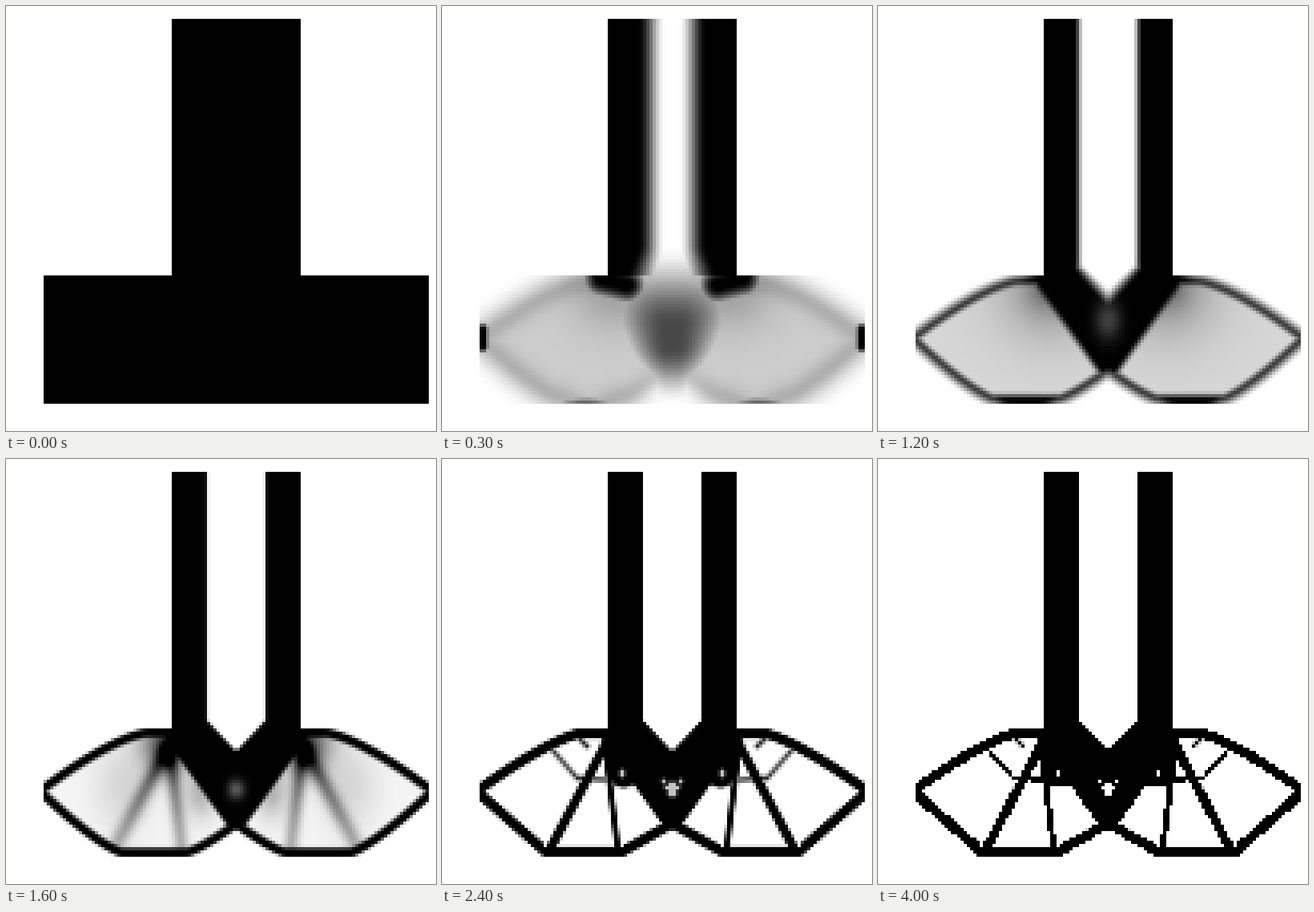
Animation of 537x530 px, one loop 5000 ms. Source, as an HTML page with a canvas:

```html
<!DOCTYPE html>
<html lang="en">
<head>
<meta charset="utf-8">
<title>Topology optimisation</title>
<style>
html, body { margin: 0; width: 100%; height: 100%; overflow: hidden; background: #fff; }
canvas { display: block; }
</style>
</head>
<body>
<canvas id="stage" width="537" height="530"></canvas>
<script>
const N = 120, HALF = 60, LOOP = 5000, STEP = 100, LAST = 4000;

const clamp = x => Math.min(1, Math.max(0, x));
const mix = (a, b, p) => a + (b - a) * p;
const smooth = (a, b, x) => { const p = clamp((x - a) / (b - a)); return p * p * (3 - 2 * p); };
const cover = (s, w) => smooth(-w, w, s);
const bell = (x, y = 0) => Math.exp(-x * x - y * y);
const signedPow = (x, p) => Math.sign(x) * Math.abs(x) ** p;

// Distances are in cells, positive inside; u runs from the left edge to the mirror axis
function bar(u, v, ax, ay, bx, by, half) {
  const dx = bx - ax, dy = by - ay;
  const k = clamp(((u - ax) * dx + (v - ay) * dy) / (dx * dx + dy * dy));
  return half - Math.hypot(u - ax - k * dx, v - ay - k * dy);
}
const gap = (f, u, v) => (v - f(u)) / Math.hypot(1, f(u + 0.5) - f(u - 0.5));

// Two power curves enclose the foot of the part
function foot(reach, topPower, flat, lowPower) {
  const top = u => 80 + 17 * signedPow(1 - u / reach, topPower);
  const low = u => 120 - Math.max(
    17.5 * signedPow(1 - u / flat, lowPower),
    8.5 * signedPow((u - 45) / 15, lowPower));
  const topRim = u => Math.max(80, top(u)), lowRim = u => Math.min(120, low(u));
  return {
    outer: (u, v) => Math.min(u < 40 ? gap(top, u, v) : 99, -gap(low, u, v)),
    inner: (u, v, rim) => Math.min(gap(topRim, u, v) - rim, -gap(lowRim, u, v) - rim, legSide(u, v))
  };
}
const legSide = (u, v) => (48.5 - u + 0.714 * (v - 98)) / Math.hypot(1, 0.714);
const stem = (u, v) => Math.max(51 - u, 0.69 * (v - 87 + 1.06 * (60 - u)));

const round = foot(32, 1.4, 24, 1.27), straight = foot(31, 1.3, 20, 1);
const strutA = (u, v, half) => bar(u, v, 38.8, 86, 22.3, 117, half);
const strutB = (u, v, half) => bar(u, v, 39.5, 88, 43.2, 118, half);

function early(u, v) {
  const column = 1 - smooth(49.5 - 4 * smooth(70, 82, v), 58, u);
  const heart = 0.72 * smooth(70, 96, v) * (1 - smooth(102, 121, v));
  const spread = 1 - smooth(0.1, 1.4, (60 - u) / (7 + 0.55 * Math.max(0, 115 - v)));
  if (v < 80) return Math.max(column, heart * spread);
  const s = round.outer(u, v);
  const shade = 0.2 + 0.12 * bell((s - 2) / 4) + 0.16 * bell((u - 42) / 13, (v - 86) / 11);
  const body = shade * smooth(-8, 3, s) * (1 - 0.9 * bell((u - 60) / 8, (v - 119) / 7));
  const corner = smooth(-7, 0.5, bar(u, v, 38, 81, 46, 83, 1.5));
  const tip = (1 - smooth(1.5, 3.5, u)) * (1 - smooth(2.5, 6, Math.abs(v - 99.5)));
  const base = 0.75 * bell((u - 33) / 9, (v - 121) / 3);
  return Math.max(body, heart * spread, corner, tip, base);
}

function soft(u, v) {
  const w = mix(1.5, 2.5, smooth(74, 84, v));
  const grey = 0.15 + 0.6 * Math.exp(-Math.hypot(u - 42, v - 84) / 9);
  const hole = cover(round.inner(u, v, 2.6), 1.5) * (1 - grey);
  const core = 1 - 0.25 * bell((u - 60) / 4, (v - 94) / 6);
  return cover(Math.min(stem(u, v), round.outer(u, v) - 0.5), w) * (1 - hole) * core;
}

function fan(u, v) {
  const fade = mix(0.5, 0.28, smooth(88, 116, v));
  const struts = bell(strutA(u, v, 0) / 2.6) + bell(strutB(u, v, 0) / 2.3);
  const grey = 0.04 + 0.12 * bell((u - 25) / 9, (v - 98) / 13) + 0.25 * bell((u - 49) / 5, (v - 100) / 8)
    + fade * struts + 0.7 * bell(Math.hypot(u - 39, v - 85) / 8);
  const hole = cover(round.inner(u, v, 2.8), 0.9) * (1 - clamp(grey));
  const core = 1 - 0.35 * bell((u - 60) / 2.5, (v - 99) / 3);
  return cover(Math.min(stem(u, v), round.outer(u, v)), 0.7) * (1 - hole) * core;
}

// Bars inside the foot; w softens the edges and fine sets the weight of the thin bars
function truss(u, v, w, fine) {
  const main = Math.max(strutA(u, v, 1.45), strutB(u, v, 0.95), bar(u, v, 42, 86, 45, 94, 4.5));
  const thin = Math.max(
    bar(u, v, 22.5, 86.5, 30.5, 95.5, 0.6),
    bar(u, v, 30.5, 95.5, 48, 96.5, 0.7),
    bar(u, v, 41, 96.7, 49, 96.5, 1.3),
    bar(u, v, 31, 83, 33.5, 85.5, 0.7));
  const pores = Math.max(
    bar(u, v, 44.5, 93.5, 44.5, 94.5, 0.6),
    bar(u, v, 58.5, 98.5, 60, 98.5, 0.6),
    bar(u, v, 59.5, 97.5, 59.5, 100.5, 0.6),
    bar(u, v, 57.5, 96.4, 57.5, 96.6, 0.5));
  const rim = 1 - cover(straight.inner(u, v, 3.2), w);
  const fill = Math.max(rim, cover(main, w), fine * cover(thin, 2 * w));
  const outer = cover(Math.min(stem(u, v), straight.outer(u, v)), w);
  return outer * fill * (1 - fine * cover(pores, 2 * w));
}

function field(f) {
  const out = new Float32Array(HALF * N);
  for (let v = 0; v < N; v++)
    for (let u = 0; u < HALF; u++)
      out[v * HALF + u] = v < 80 && u < 40 ? 0 : clamp(f(u + 0.5, v + 0.5));
  return out;
}

const trussed = field((u, v) => truss(u, v, 0.5, 0.85));
const done = field((u, v) => truss(u, v, 0.01, 1));
const nearly = done.map((d, i) => smooth(0.15, 0.85, mix(trussed[i], d, 0.8)));
const keys = [
  [0, field(() => 1)], [300, field(early)], [1200, field(soft)], [1600, field(fan)],
  [2400, trussed], [3200, nearly], [LAST, done]
];

const ctx = document.getElementById('stage').getContext('2d');
const grid = document.createElement('canvas');
grid.width = grid.height = N;
const gridCtx = grid.getContext('2d');
const image = gridCtx.createImageData(N, N);
image.data.fill(255);

function paint(x, y, shade) {
  const k = 4 * (y * N + x);
  image.data.fill(shade, k, k + 3);
}

function draw(t) {
  let i = 0;
  while (i < keys.length - 2 && t >= keys[i + 1][0]) i++;
  const [t0, a] = keys[i], [t1, b] = keys[i + 1];
  let p = (t - t0) / (t1 - t0);
  if (i < 2) p = 1 - Math.pow(1 - p, 1.4);
  for (let y = 0; y < N; y++)
    for (let x = 0; x < HALF; x++) {
      const k = y * HALF + x;
      const shade = Math.round(255 * (1 - mix(a[k], b[k], p)));
      paint(x, y, shade);
      paint(N - 1 - x, y, shade);
    }
  gridCtx.putImageData(image, 0, 0);
  ctx.fillStyle = '#fff';
  ctx.fillRect(0, 0, 537, 530);
  ctx.imageSmoothingEnabled = false;
  ctx.drawImage(grid, 47, 16, 481, 480);
}

const start = performance.now();
let shown = -1;
function tick() {
  const t = (performance.now() - start) % LOOP;
  const step = Math.min(LAST, Math.floor(t / STEP) * STEP);
  if (step !== shown) draw(shown = step);
  requestAnimationFrame(tick);
}
tick();
</script>
</body>
</html>
```
